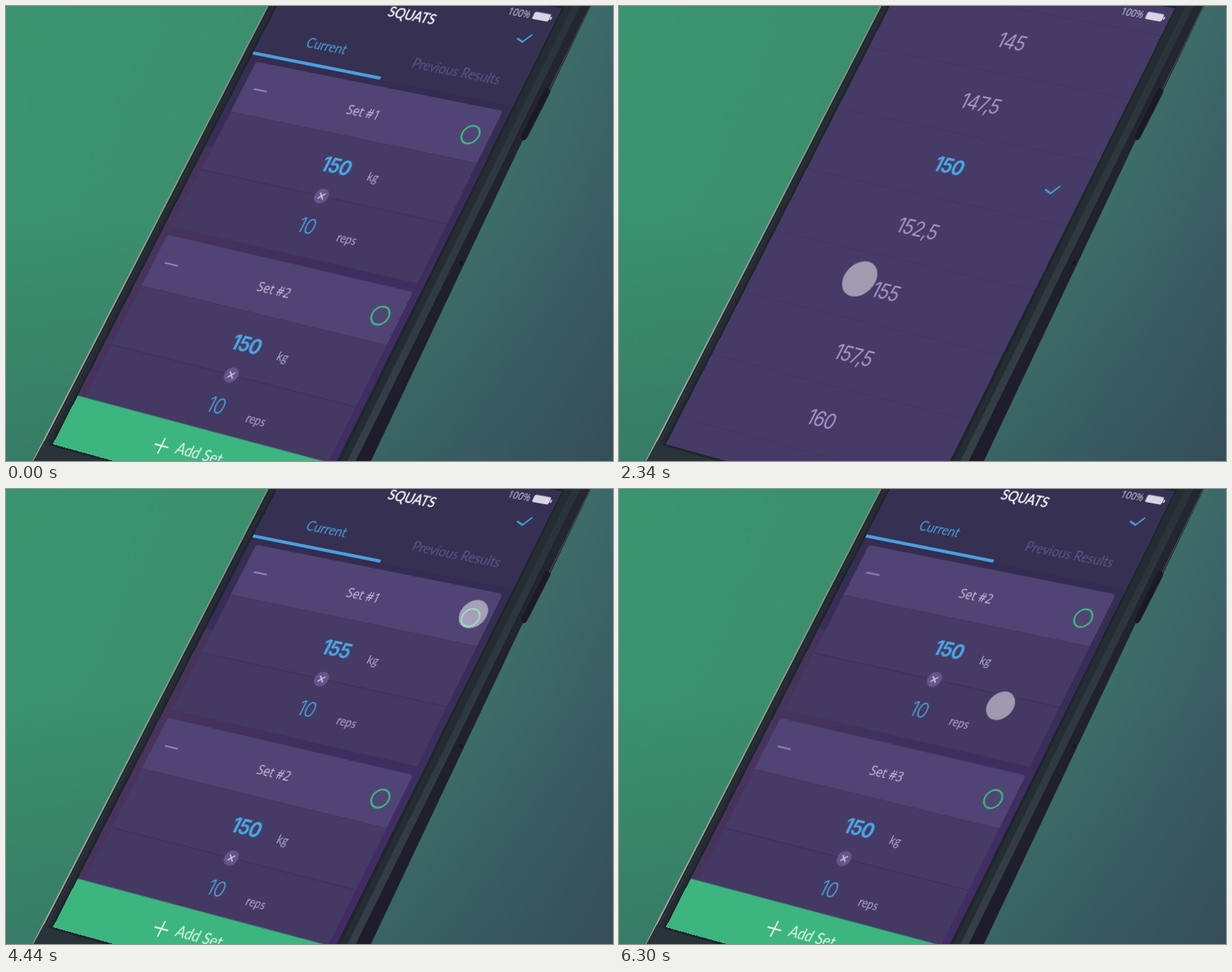
An HTML page that plays this animation: 800 px wide and 600 px high, repeating every 6330 ms.

```html
<!DOCTYPE html>
<html lang="en">
<head>
<meta charset="utf-8">
<title>Workout sets</title>
<style>
html, body { margin: 0; width: 100%; height: 100%; overflow: hidden; }
#stage {
  position: relative; width: 800px; height: 600px; overflow: hidden;
  background:
    linear-gradient(180deg, transparent 45%, rgba(45, 75, 85, .3) 100%),
    linear-gradient(113deg, #39956f 0%, #3c8e6d 38%, #3e746a 66%, #3b6165 82%, #394f5a 100%);
}
#stage > svg { position: absolute; left: 0; top: 0; }
#screen {
  transform-origin: 0 0;
  transform: matrix3d(.83875, .16672, 0, -.00011696, -.50944, .97039, 0, -.00003768, 0, 0, 1, 0, 389.13, -59.45, 0, 1.00452);
}
text { font-family: Lato, "Open Sans", sans-serif; }
.num, .row { font-family: Inter, Roboto, sans-serif; font-size: 25px; letter-spacing: -.9px; }
.title, .pct { font-family: "Open Sans", Roboto, sans-serif; }
.mid { text-anchor: middle; }
.title { font-size: 16px; fill: #cbc2e6; }
.num { fill: #4ba6e2; }
.kilo { font-weight: 700; }
.reps { font-weight: 300; }
.unit { font-size: 14.5px; fill: #b3a9d6; }
.row { fill: #a396ca; }
.row.on { fill: #4ba6e2; font-weight: 700; }
.line { fill: none; stroke-width: 2; }
</style>
</head>
<body>
<div id="stage">
  <svg width="800" height="600">
    <defs>
      <linearGradient id="side" x1="0" y1="0" x2="0" y2="1">
        <stop offset="0" stop-color="#24272f"/><stop offset="1" stop-color="#1e1c2b"/>
      </linearGradient>
      <linearGradient id="rim" x1="0" y1="0" x2="0" y2="1">
        <stop offset="0" stop-color="#2a3339"/><stop offset="1" stop-color="#343f47"/>
      </linearGradient>
      <linearGradient id="steel" x1="0" y1="0" x2="0" y2="1">
        <stop offset="0" stop-color="#7f8b82"/><stop offset="1" stop-color="#a9aba3"/>
      </linearGradient>
    </defs>
    <path d="M345 0H771L718 110Q718 113 715 119L688 172Q685 178 681 177L481 600H36Z" fill="url(#side)"/>
    <path d="M345 0H757L461 600H36Z" fill="url(#rim)"/>
    <path d="M349 0H747L450 600H41Z" fill="#252c34"/>
    <path d="M345 0L36 600" stroke="url(#steel)" stroke-width="1.8"/>
    <path d="M347.500 0L38.500 600" stroke="#1d2529" stroke-width="1.6"/>
    <path d="M770 0L716 110" stroke="#4b5453" stroke-width="1"/>
    <path d="M711 108L681 168Q677 176 684 177L716 114Q717 107 711 108Z" fill="#1a1924"/>
    <ellipse cx="600" cy="339" rx="2" ry="3" fill="#14141c"/>
    <path d="M354 0L58 579L130 600H441L736 0Z" fill="#1f252d"/>
    <path d="M50 574L36 600H130L58 580Z" fill="#2a3339"/>
  </svg>
  <svg id="screen" width="375" height="645">
    <defs>
      <linearGradient id="wall" x1="0" y1="0" x2="0" y2="1">
        <stop offset="0" stop-color="#312b4d"/><stop offset=".25" stop-color="#352d52"/>
        <stop offset=".6" stop-color="#3f2e60"/><stop offset="1" stop-color="#422b67"/>
      </linearGradient>
      <linearGradient id="warm">
        <stop offset="0" stop-color="#4b365a" stop-opacity=".7"/><stop offset=".7" stop-color="#4b365a" stop-opacity="0"/>
      </linearGradient>
      <filter id="soft" x="-.2" y="-.4" width="1.4" height="1.8"><feGaussianBlur stdDeviation="5"/></filter>
      <clipPath id="gap"><rect id="hole" width="375"/></clipPath>
    </defs>
    <rect width="375" height="645" fill="url(#wall)"/>
    <rect y="250" width="375" height="395" fill="url(#warm)"/>
    <g id="list" clip-path="url(#gap)"></g>
    <g id="cards"></g>
    <g id="add">
      <rect y="581.5" width="375" height="64" fill="#3db57f"/>
      <path class="line" d="M134 613h20M144 603v20" stroke="#e4f6ec"/>
      <text x="165" y="617" font-size="19" fill="#e4f6ec">Add Set</text>
    </g>
    <g id="head">
      <rect width="375" height="127" fill="#363052"/>
      <text class="mid" x="187.5" y="48" font-size="17.5" fill="#fff" stroke="#fff" stroke-width=".4">SQUATS</text>
      <path class="line" d="M337.500 45.500l9 3.300 7.700-11" stroke="#4ba6e2"/>
      <text class="mid" x="95" y="105.5" font-size="17.2" fill="#4a9fda">Current</text>
      <text class="mid" x="281" y="105.5" font-size="17.2" fill="#5d5488">Previous Results</text>
      <rect y="123" width="187.5" height="4" fill="#4b9fdc"/>
    </g>
    <g fill="#d9d5e4">
      <text class="mid pct" x="324.5" y="19" font-size="12">100%</text>
      <rect x="343.500" y="9.400" width="22.500" height="9.500" rx="2"/>
      <rect x="366.6" y="12.2" width="2" height="4" rx="1"/>
    </g>
    <circle id="tap" fill="#fff"/>
  </svg>
</div>
<script>
const LOOP = 6330, ROW = 82, MID = 241, BLUE = "#4ba6e2";
const $ = id => document.getElementById(id);
const clamp = x => Math.max(0, Math.min(1, x));
const ease = (t, start, span) => { const x = clamp((t - start) / span); return x * x * (3 - 2 * x); };
const mix = (a, b, k) => `color-mix(in srgb, ${b} ${(k * 100).toFixed(1)}%, ${a})`;
const move = (el, x, y, s = 1) => el.setAttribute("transform", `translate(${x} ${y}) scale(${s})`);
const show = (el, o) => el.setAttribute("opacity", o);

function add(parent, tag, attrs = {}, text) {
  const el = document.createElementNS("http://www.w3.org/2000/svg", tag);
  for (const k in attrs) el.setAttribute(k, attrs[k]);
  if (text) el.textContent = text;
  parent.append(el);
  return el;
}

// vertical motion blur shared by a set of elements
function smear(id, els) {
  const f = add($("screen").querySelector("defs"), "filter",
    { id, filterUnits: "userSpaceOnUse", x: -40, y: -250, width: 460, height: 1100 });
  const g = add(f, "feGaussianBlur", { stdDeviation: "0 0" });
  return step => {
    const d = Math.abs(step) * .22;
    g.setAttribute("stdDeviation", `0 ${d}`);
    els.forEach(e => d > .4 ? e.setAttribute("filter", `url(#${id})`) : e.removeAttribute("filter"));
  };
}

function makeCard(n) {
  const g = add($("cards"), "g"), c = { g };
  const sub = name => c[name] = add(g, "g");
  add(sub("top"), "path", { d: "M10.5 67.5V4q0-4 4-4H361q4 0 4 4V67.5Z", fill: "#504474" });
  add(sub("one"), "rect", { x: 10.5, y: 67.5, width: 354.5, height: 78, fill: "#453b66" });
  add(c.one, "rect", { x: 10.5, y: 67, width: 354.5, height: 1, fill: "#41375f" });
  add(sub("two"), "rect", { x: 10.5, y: 145, width: 354.5, height: 76, fill: "#433963" });
  add(c.two, "rect", { x: 10.5, y: 144.5, width: 354.5, height: 1, fill: "#3a3157" });
  c.green = add(g, "rect", { x: 10.5, width: 354.5, height: 221, rx: 2, fill: "#3db57f", opacity: 0 });
  c.minus = add(g, "path", { class: "line", d: "M26 34h19.5", stroke: "#8e84b2" });
  c.title = add(g, "text", { class: "mid title", x: 188, y: 41 }, "Set #" + n);
  c.ring = add(g, "circle", { class: "line", cx: 339.2, cy: 35.5, r: 11.3, stroke: "#3cc285" });
  c.tick = add(g, "path", { class: "line", d: "M333.5 35.5l5 2.5 6-7", stroke: "#fff", pathLength: 1, "stroke-dasharray": "1 2", opacity: 0 });
  c.num = add(g, "text", { class: "mid num kilo", x: 188, y: 115 }, "150");
  c.kg = add(g, "text", { class: "unit", x: 235, y: 115.5 }, "kg");
  sub("badge");
  c.dot = add(c.badge, "circle", { cx: 188, cy: 145, r: 9.6, fill: "#62568a" });
  add(c.badge, "path", { class: "line", d: "M184.3 141.3l7.4 7.4m0-7.4l-7.4 7.4", stroke: "#d8d1ef" }).style.strokeWidth = 1.5;
  c.ten = add(g, "text", { class: "mid num reps", x: 188.5, y: 193.5 }, "10");
  c.reps = add(g, "text", { class: "unit", x: 235, y: 194.5 }, "reps");
  return c;
}

const cards = [3, 2, 1].map(makeCard).reverse(), first = cards[0];

const rows = [];
for (let i = -5; i <= 7; i++) {
  const g = add($("list"), "g");
  rows.push({
    i, g,
    bg: add(g, "rect", { x: -187.5, y: -41, width: 375, height: ROW, fill: "#453b66" }),
    rule: add(g, "rect", { x: -187.5, y: 40.5, width: 375, height: 1, fill: "#3d3359" }),
    text: add(g, "text", { class: "mid row", y: 9.1 }, String(150 + 2.5 * i).replace(".", ","))
  });
}
const mark = add($("list"), "path", { class: "line", d: "M-8.5 3l9 3.3 7.7-11", stroke: BLUE });

const blurUp = smear("bu", [first.top, first.title, first.ring, first.minus, $("head")]);
const blurLow = smear("bl", [first.two, first.ten, first.reps, $("add")]);
const blurBadge = smear("bb", [first.badge]);
const blurCard = [1, 2].map(k => smear("bc" + k, [cards[k].g]));

// [start, arrive, press, release, from u, from v, to u, to v]
const taps = [
  [690, 900, 1125, 1200, 361, 399, 156, 240],
  [2130, 2340, 2390, 2470, 155, 562, 145, 397],
  [3960, 4200, 4370, 4480, 300, 300, 340.6, 165.7],
  [5400, 5640, 5670, 9000, 320, 450, 290, 369.5]
];

const phase = t => t < 2000 ? Math.max(0, Math.min(420, t - 1190)) : Math.max(0, Math.min(420, 3160 - t));
const spread = t => ease(phase(t), 0, 300);
const scroll = t => 76 * ease(t, 5730, 603);
const badgeUp = t => ease(t, 4640, 360);
const cardY = (t, k) => 135 + 232 * k - 156 * ease(t, 4583 + 95 * (k - 1), 400) + 376 * spread(t) - scroll(t);

function drawList(t, ph, up, low) {
  const picked = t >= 2430, sel = picked ? 2 : 0;
  const shift = 164 * ease(t, 2500, 240);
  $("list").style.display = ph > 0 ? "" : "none";
  $("hole").setAttribute("y", 202.5 + up);
  $("hole").setAttribute("height", 77.5 + low - up);
  for (const r of rows) {
    const n = Math.abs(r.i - sel);
    const s = n ? ease(ph, 14 + 42 * (n - 1), 200) : 1;
    const wide = n ? 1 : .945 + .055 * ease(ph, 0, 150);
    move(r.g, 187.5, MID + ROW * r.i - shift, s);
    r.bg.setAttribute("transform", `scale(${wide} 1)`);
    show(r.bg, s);
    show(r.rule, s > .97 ? 1 : 0);
    if (s < .98) r.bg.setAttribute("filter", "url(#soft)"); else r.bg.removeAttribute("filter");
    r.text.setAttribute("class", n ? "mid row" : "mid row on");
  }
  const m = ease(ph, 110, 200) * (picked ? ease(t, 2440, 180) : 1);
  move(mark, 334, MID + ROW * sel - shift, m);
}

function drawFirst(t, ph, up, low) {
  const q = ease(t, 4540, 360), b = badgeUp(t), fill = clamp((t - 4490) / 130);
  const c = first, open = ph > 0;
  move(c.g, 0, 135 - scroll(t));
  [c.top, c.title, c.ring, c.minus].forEach(e => move(e, 0, up));
  move(c.two, 0, low);
  [c.top, c.two].forEach(e => show(e, fill < 1 ? 1 : 0));
  show(c.one, open || fill === 1 ? 0 : 1);
  show(c.green, fill);
  c.green.setAttribute("height", 221 - 155.5 * q);
  show(c.title, 1 - clamp(q * 3));
  c.num.textContent = t < 2430 ? "150" : "155";
  show(c.num, open ? 0 : 1);
  move(c.num, -89 * q, -73.3 * q);
  move(c.kg, -104 * q, -72.5 * q);
  show(c.kg, 1 - clamp(ph / 100));
  move(c.badge, 0, low - 111 * b);
  show(c.dot, 1 - .85 * b);
  move(c.ten, 60.5 * q, low - 152 * q);
  move(c.reps, 35 * q, low - 154 * q);
  c.num.style.fill = c.ten.style.fill = mix(BLUE, "#fff", q);
  c.kg.style.fill = c.reps.style.fill = mix("#b3a9d6", "#dff5ea", q);
  c.minus.style.stroke = mix("#8e84b2", "#fff", fill);
  c.ring.style.stroke = mix("#3cc285", "#fff", fill);
  show(c.tick, t > 4640 ? 1 : 0);
  c.tick.setAttribute("stroke-dashoffset", 1 - ease(t, 4640, 300));
}

function drawTap(t) {
  const tap = taps.find(p => t >= p[0] && t < p[3] + 90);
  if (!tap) return show($("tap"), 0);
  const [start, arrive, press, release, u0, v0, u1, v1] = tap;
  const k = ease(t, start, arrive - start);
  $("tap").setAttribute("cx", u0 + (u1 - u0) * k);
  $("tap").setAttribute("cy", v0 + (v1 - v0) * k - scroll(t));
  $("tap").setAttribute("r", 22.5 - 4.5 * ease(t, press, 65));
  show($("tap"), .49 * clamp((t - start) / 90) * (1 - clamp((t - release) / 90)));
}

function draw(t) {
  const ph = phase(t), p = spread(t), up = -202.5 * p, low = 376 * p;
  const dp = p - spread(t - 30);
  drawList(t, ph, up, low);
  drawFirst(t, ph, up, low);
  [1, 2].forEach(k => {
    move(cards[k].g, 0, cardY(t, k));
    blurCard[k - 1](cardY(t, k) - cardY(t - 30, k));
  });
  move($("head"), 0, up);
  move($("add"), 0, low);
  blurUp(202.5 * dp);
  blurLow(376 * dp);
  blurBadge(376 * dp - 111 * (badgeUp(t) - badgeUp(t - 30)));
  drawTap(t);
}

const begin = performance.now();
function tick() {
  draw((performance.now() - begin) % LOOP);
  requestAnimationFrame(tick);
}
tick();
</script>
</body>
</html>
```
